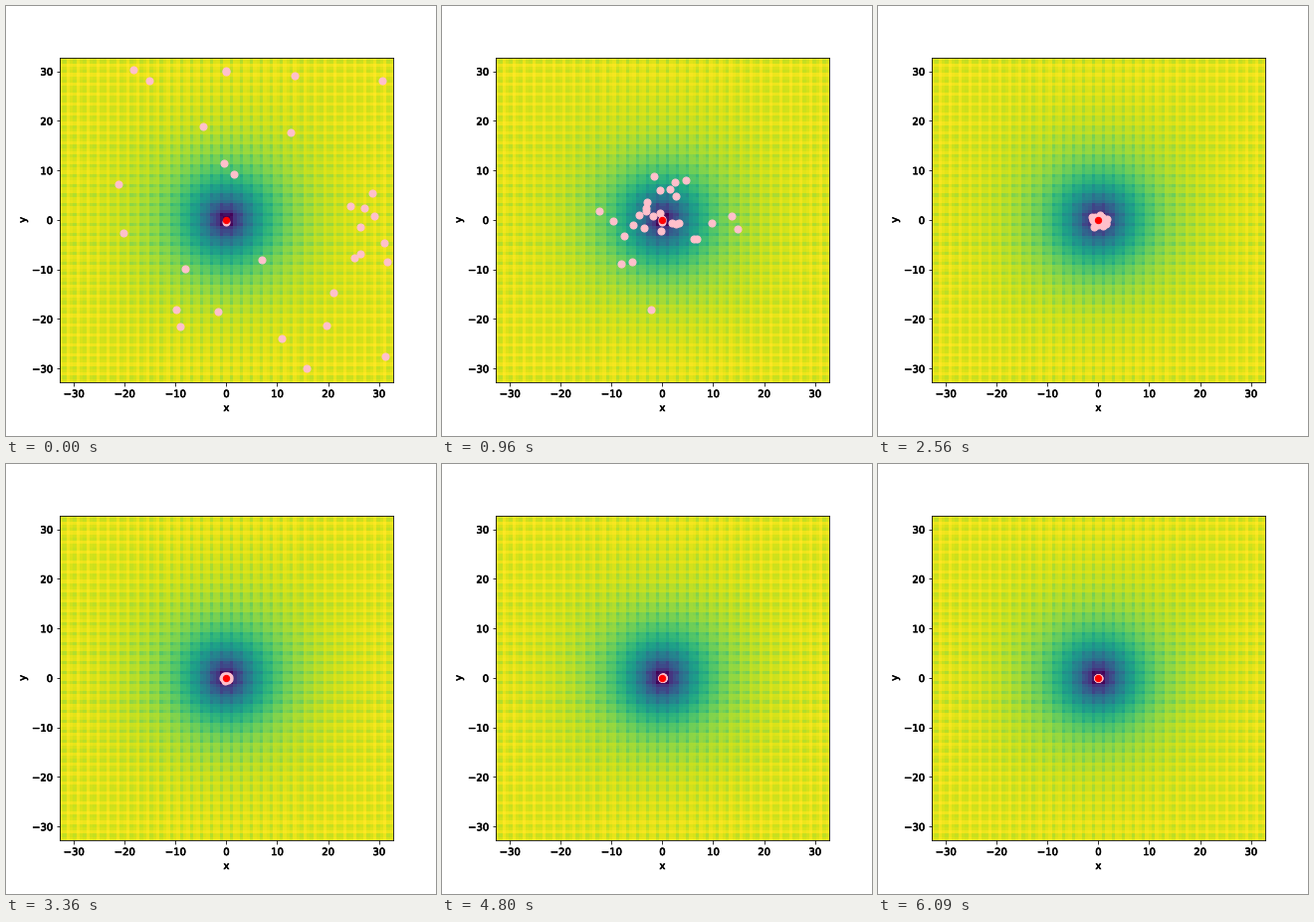
Animation of 432 by 432 pixels, one loop 8000 ms. Source, as a matplotlib script:

```python
import numpy as np
import matplotlib.pyplot as plt
from matplotlib.animation import FuncAnimation
from matplotlib.patheffects import withStroke

LIM = 32.768
FRAMES, STEP_MS = 50, 160
LAST_GEN = 38
POP = 32
DECAY = 5.5  # generations for the search radius to shrink by e


def ackley(x, y):
    bowl = -20 * np.exp(-0.2 * np.sqrt((x**2 + y**2) / 2))
    ripple = -np.exp((np.cos(2 * np.pi * x) + np.cos(2 * np.pi * y)) / 2)
    return bowl + ripple + 20 + np.e


def evolve(seed):
    """Greedy evolution: coordinates cross over, only better trials survive."""
    rng = np.random.default_rng(seed)
    pop = rng.uniform(-LIM, LIM, (POP, 2))
    history = [pop]
    for gen in range(1, LAST_GEN + 1):
        radius = 22 * np.exp(-gen / DECAY)
        mutant = rng.normal(0, radius, pop.shape)
        trial = np.where(rng.random(pop.shape) < 0.7, mutant, pop)
        better = np.hypot(*trial.T) < np.hypot(*pop.T)
        pop = np.where(better[:, None], trial, pop)
        history.append(pop)
    return history


history = evolve(seed=4)

fig, ax = plt.subplots(figsize=(6, 6), dpi=72)
fig.subplots_adjust(left=0.125, right=0.9, bottom=0.125, top=0.88)

axis = np.linspace(-LIM, LIM, 100)
ax.imshow(ackley(*np.meshgrid(axis, axis)), cmap="viridis", origin="lower",
          extent=(-LIM, LIM, -LIM, LIM), aspect="auto",
          interpolation="nearest")
ax.set(xlabel="x", ylabel="y")

# Slightly heavy lettering
heavy = [withStroke(linewidth=0.6, foreground="black")]
for label in [ax.xaxis.label, ax.yaxis.label,
              *ax.get_xticklabels(), *ax.get_yticklabels()]:
    label.set_path_effects(heavy)

swarm = ax.scatter(*history[0].T, s=50, c="pink", zorder=2)
ax.scatter(0, 0, s=40, c="red", zorder=3)


def update(i):
    swarm.set_offsets(history[min(i, LAST_GEN)])
    return (swarm,)


anim = FuncAnimation(fig, update, frames=FRAMES, interval=STEP_MS,
                     repeat=True, repeat_delay=0)
plt.show()
```
